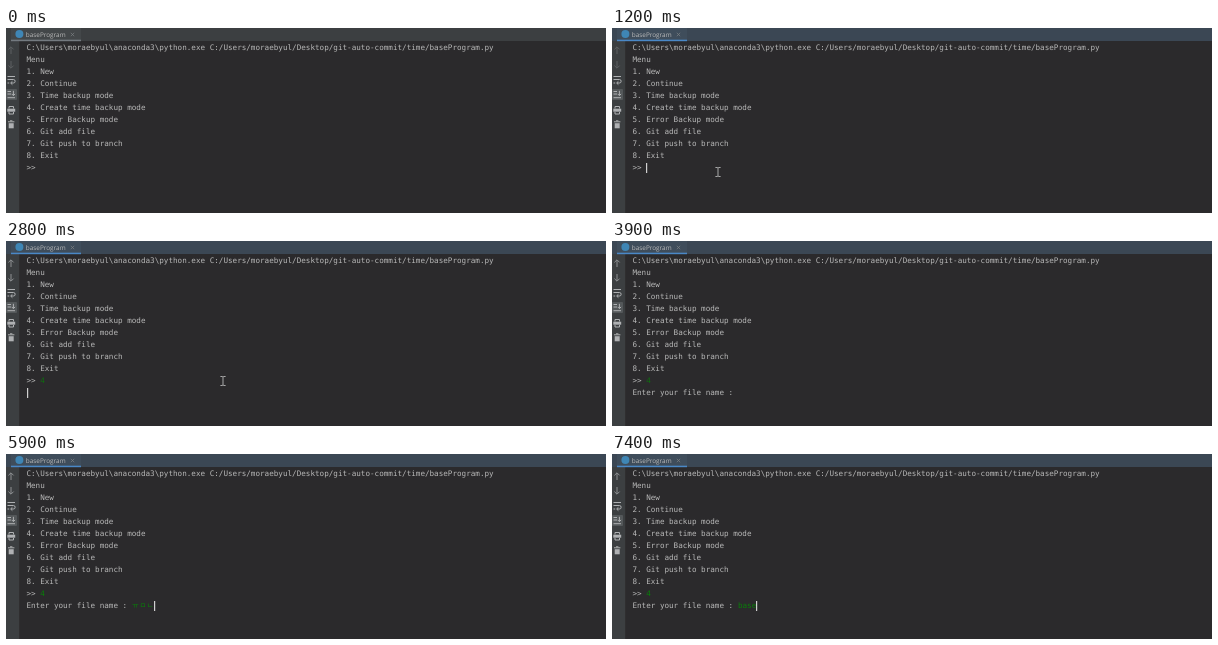
An HTML page for the animation above (8 s loop, 600x185 px).

```html
<!DOCTYPE html>
<html lang="en">
<head>
<meta charset="utf-8">
<title>baseProgram</title>
<style>
  html, body { margin: 0; width: 100%; height: 100%; overflow: hidden; background: #2b2a2c; }
  svg { display: block; width: 600px; height: 185px; }
  text { white-space: pre; text-rendering: geometricPrecision; }
  .con { font: 7.62px "DejaVu Sans Mono", "Noto Sans Mono", monospace; fill: #b8b8b8; }
  .tab { font: 6.4px "Open Sans", "Noto Sans", sans-serif; fill: #bbb; }
  .jamo { font: 7.35px "Noto Sans CJK KR", "Noto Sans CJK", sans-serif; }
  .in { fill: #087f08; }
  .icon { fill: none; stroke: #afb1b3; stroke-width: 1; }

  /* One 8 s clock for everything; all changes are hard cuts. */
  .a { animation: 8s step-end infinite; }
  .head { animation-name: head; }
  .seltab { animation-name: seltab; }
  .line { animation-name: line; }
  .arrows { animation-name: arrows; }
  .mouse { animation-name: mouse; }
  .caret { animation-name: caret; }
  .pick { animation-name: pick; }
  .prompt { animation-name: prompt; }
  .j1 { animation-name: j1; }
  .j2 { animation-name: j2; }
  .j3 { animation-name: j3; }
  .k1 { animation-name: k1; }
  .k2 { animation-name: k2; }
  .k3 { animation-name: k3; }
  .k4 { animation-name: k4; }

  /* Console gains focus */
  @keyframes head { 0% { fill: #3c3f41; } 15%, 100% { fill: #3b4754; } }
  @keyframes seltab { 0% { fill: #434749; } 15%, 100% { fill: #3f4d5b; } }
  @keyframes line { 0% { fill: #747a80; } 15%, 100% { fill: #4a88c7; } }
  @keyframes arrows { 0% { stroke: #5d6062; } 16.25%, 100% { stroke: #8e9193; } }

  @keyframes mouse {
    0% { transform: translate(-20px, 0); }
    6.25% { transform: translate(138px, 162px); }
    7.5% { transform: translate(126px, 159px); }
    8.75% { transform: translate(108px, 152px); }
    10% { transform: translate(96px, 147px); }
    11.25% { transform: translate(91px, 145px); }
    15% { transform: translate(106px, 144px); }
    16.25% { transform: translate(138px, 142px); }
    17.5% { transform: translate(173px, 140px); }
    18.75% { transform: translate(198px, 140px); }
    20% { transform: translate(217px, 140px); }
    40% { transform: translate(231px, 140px); }
    41.25% { transform: translate(246px, 140px); }
    42.5% { transform: translate(252px, 140px); }
    45% { transform: translate(251px, 148px); }
    46.25% { transform: translate(249px, 158px); }
    47.5% { transform: translate(247px, 165px); }
    48.75%, 100% { transform: translate(-20px, 0); }
  }

  @keyframes caret {
    0% { transform: translate(34px, 140px); opacity: 0; }
    13.75% { transform: translate(34px, 140px); opacity: 1; }
    25% { transform: translate(34px, 140px); opacity: 0; }
    27.5% { transform: translate(34px, 140px); opacity: 1; }
    30% { transform: translate(39px, 140px); opacity: 1; }
    32.5% { transform: translate(39px, 140px); opacity: 0; }
    35% { transform: translate(21px, 152px); opacity: 1; }
    37.5% { transform: translate(126px, 152px); opacity: 1; }
    45% { transform: translate(126px, 152px); opacity: 0; }
    52.5% { transform: translate(126px, 152px); opacity: 1; }
    57.5% { transform: translate(126px, 152px); opacity: 0; }
    60% { transform: translate(126px, 152px); opacity: 1; }
    67.5% { transform: translate(133px, 152px); opacity: 1; }
    70% { transform: translate(141px, 152px); opacity: 1; }
    72.5% { transform: translate(148px, 152px); opacity: 1; }
    78.75% { transform: translate(141px, 152px); opacity: 1; }
    80% { transform: translate(126px, 152px); opacity: 1; }
    86.25% { transform: translate(131px, 152px); opacity: 1; }
    88.75% { transform: translate(135px, 152px); opacity: 1; }
    90% { transform: translate(140px, 152px); opacity: 1; }
    92.5%, 100% { transform: translate(144px, 152px); opacity: 1; }
  }

  @keyframes pick { 0% { opacity: 0; } 30% { opacity: .8; } 62.5%, 100% { opacity: 1; } }
  @keyframes prompt { 0% { opacity: 0; } 37.5%, 100% { opacity: 1; } }
  @keyframes j1 { 0% { opacity: 0; } 67.5% { opacity: 1; } 80%, 100% { opacity: 0; } }
  @keyframes j2 { 0% { opacity: 0; } 70% { opacity: 1; } 80%, 100% { opacity: 0; } }
  @keyframes j3 { 0% { opacity: 0; } 72.5% { opacity: 1; } 78.75%, 100% { opacity: 0; } }
  @keyframes k1 { 0% { opacity: 0; } 86.25%, 100% { opacity: 1; } }
  @keyframes k2 { 0% { opacity: 0; } 88.75%, 100% { opacity: 1; } }
  @keyframes k3 { 0% { opacity: 0; } 90%, 100% { opacity: 1; } }
  @keyframes k4 { 0% { opacity: 0; } 92.5%, 100% { opacity: 1; } }
</style>
</head>
<body>
<svg viewBox="0 0 600 185">
  <rect width="600" height="185" fill="#2b2a2c"/>

  <!-- Tool bar -->
  <rect y="13" width="13" height="172" fill="#3c3f41"/>
  <rect x="13" y="13" width="0.7" height="172" fill="#323232"/>
  <g class="icon">
    <g class="a arrows">
      <path d="M5 26V19M2.4 21.4L5 18.8L7.6 21.4"/>
      <path d="M5 33V40M2.4 37.6L5 40.2L7.6 37.6"/>
    </g>
    <path d="M1.5 48.5H9M1.5 51.5H7.4a1.7 1.7 0 0 1 0 3.5H5M6.4 53.3L4.6 55L6.4 56.7M1.5 55H3.2"/>
    <rect x="0" y="61" width="11" height="11" rx="1" fill="#54585a" stroke="none"/>
    <path d="M1.5 63.5H5M1.5 66H5M1.5 69.7H9M7.4 62.8V67.4M5.7 65.9L7.4 67.6L9.1 65.9"/>
    <path d="M3 80.5V78.5H7.5V80.5M3 84V86H7.5V84"/>
    <path d="M1.3 82.2H9.2" stroke-width="3"/>
    <path d="M2 93.8H8.4M4 92.8H6.4"/>
    <path d="M2.7 95.2H7.7V100.3H2.7Z" fill="#afb1b3" stroke="none"/>
  </g>

  <!-- Header and tab -->
  <rect class="a head" width="600" height="13" fill="#3c3f41"/>
  <rect class="a seltab" x="5" width="70" height="12" fill="#434749"/>
  <rect class="a line" x="5" y="11.7" width="70" height="1.5" fill="#747a80"/>
  <circle cx="13.4" cy="6" r="4" fill="#3f86b5"/>
  <text class="tab" x="19.8" y="8.7">baseProgram</text>
  <path d="M64.8 4.8L68.2 8.2M68.2 4.8L64.8 8.2" stroke="#7d8184" stroke-width="0.7"/>

  <!-- Console -->
  <g class="con">
    <text x="20.4" y="22">C:\Users\moraebyul\anaconda3\python.exe C:/Users/moraebyul/Desktop/git-auto-commit/time/baseProgram.py</text>
    <text x="20.4" y="34">Menu</text>
    <text x="20.4" y="46">1. New</text>
    <text x="20.4" y="58">2. Continue</text>
    <text x="20.4" y="70">3. Time backup mode</text>
    <text x="20.4" y="82">4. Create time backup mode</text>
    <text x="20.4" y="94">5. Error Backup mode</text>
    <text x="20.4" y="106">6. Git add file</text>
    <text x="20.4" y="118">7. Git push to branch</text>
    <text x="20.4" y="130">8. Exit</text>
    <text x="20.4" y="142">&gt;&gt;</text>
    <text class="in a pick" x="34.2" y="142">4</text>
    <text class="a prompt" x="20.4" y="154">Enter your file name :</text>
    <g class="in jamo">
      <text class="a j1" x="126" y="154">ㅠ</text>
      <text class="a j2" x="133.4" y="154">ㅁ</text>
      <text class="a j3" x="140.7" y="154">ㄴ</text>
    </g>
    <g class="in">
      <text class="a k1" x="125.9" y="154">b</text>
      <text class="a k2" x="130.5" y="154">a</text>
      <text class="a k3" x="135.1" y="154">s</text>
      <text class="a k4" x="139.7" y="154">e</text>
    </g>
  </g>

  <rect class="a caret" y="-5" width="1.2" height="10" fill="#d0d0d0"/>
  <path class="a mouse" d="M-2.6 -4.5H-0.7L0 -4L0.7 -4.5H2.6M0 -4V4M-2.6 4.5H-0.7L0 4L0.7 4.5H2.6" fill="none" stroke="#c0c0c0" stroke-width="0.85"/>
</svg>
</body>
</html>
```
